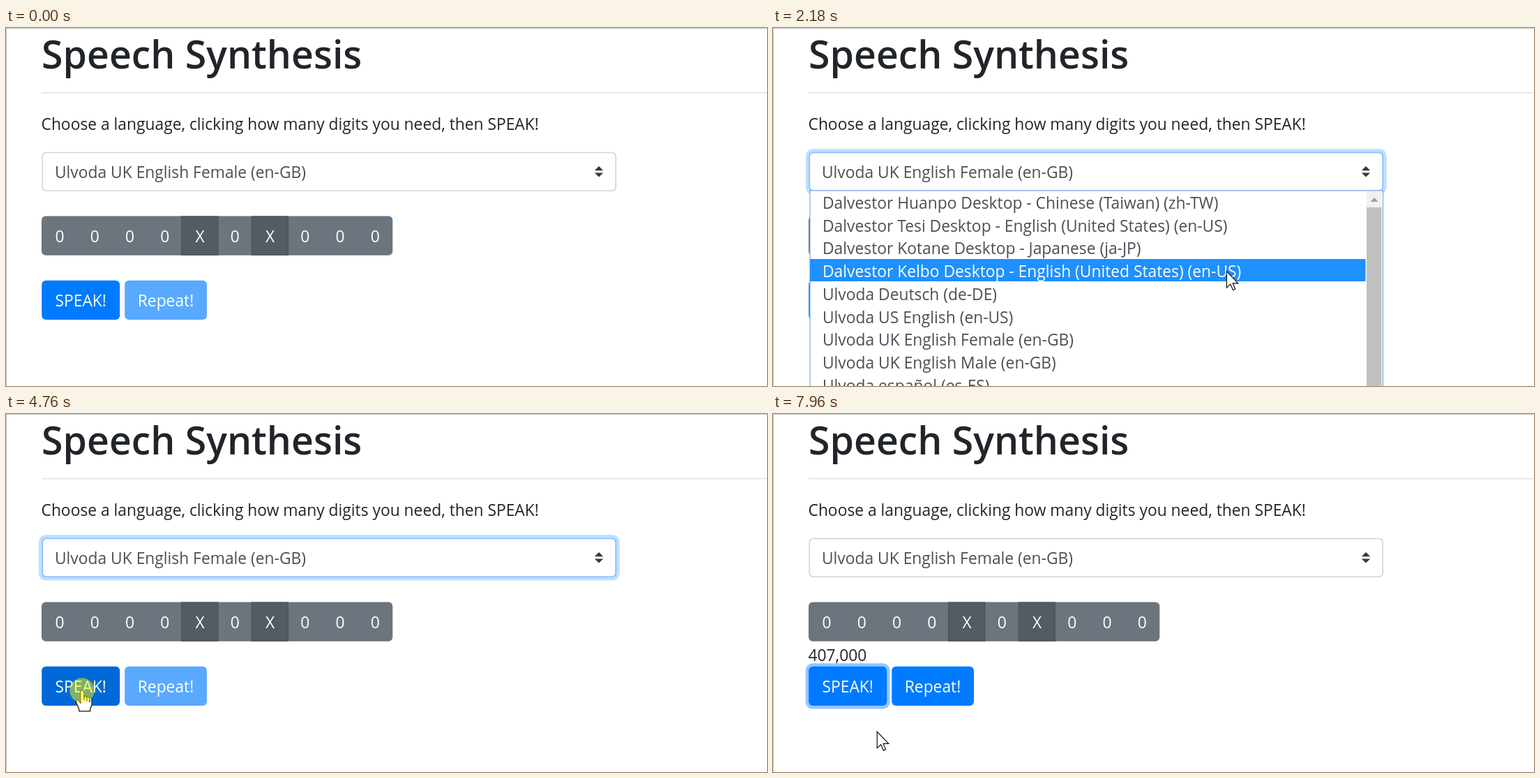
Recreate the animation shown at these times as an HTML page with a canvas. Size 1091x513 px, loop 8000 ms.

```html
<!DOCTYPE html>
<html lang="en">
<head>
<meta charset="utf-8">
<title>Speech Synthesis</title>
<style>
html, body { margin: 0; width: 100%; height: 100%; overflow: hidden; background: #fff; }
canvas { display: block; }
</style>
</head>
<body>
<canvas id="stage" width="1091" height="513"></canvas>
<script>
const ctx = document.getElementById('stage').getContext('2d');
const LOOP = 8000;
const FAMILY = '"Open Sans", "Noto Sans", sans-serif';
const BODY = `22.8px ${FAMILY}`;
const VOICE = 'Ulvoda UK English Female (en-GB)';
const OPTIONS = [
  'Dalvestor Huanpo Desktop - Chinese (Taiwan) (zh-TW)',
  'Dalvestor Tesi Desktop - English (United States) (en-US)',
  'Dalvestor Kotane Desktop - Japanese (ja-JP)',
  'Dalvestor Kelbo Desktop - English (United States) (en-US)',
  'Ulvoda Deutsch (de-DE)',
  'Ulvoda US English (en-US)',
  VOICE,
  'Ulvoda UK English Male (en-GB)',
  'Ulvoda español (es-ES)'
];
const ROW_TOP = 233, ROW_STEP = 32.7;
const TICK = 78; // pointer refresh interval

const smooth = k => k * k * (3 - 2 * k);
const easeOut = k => 1 - (1 - k) ** 2;

// Each move carries the pointer on from where the last one ended
const ENTRY = { x: 960, y: 498 };
const MOVES = [
  { from: 150, to: 870, x: 689, y: 189 },
  { from: 1710, to: 2490, x: 629, y: 435 },
  { from: 2560, to: 2790, x: 627, y: 444 },
  { from: 3190, to: 3970, x: 102, y: 423 },
  { from: 4040, to: 4440, x: 109, y: 396 },
  { from: 5300, to: 5700, x: 121, y: 435 },
  { from: 6020, to: 6320, x: 115, y: 388, ease: easeOut },
  { from: 7100, to: 7500, x: 136, y: 455 },
  { from: 7880, to: 7960, x: 149, y: 455 }
];

const OPEN = { from: 1180, to: 2960 };
const SPEAK = [{ from: 4760, to: 4905 }, { from: 6630, to: 6780 }];
const CLICKS = [{ from: 1000, to: 1180 }, { from: 2790, to: 2960 }, ...SPEAK];
const HOVERS = [{ from: 4040, to: 5460 }, { from: 6095, to: 7260 }];

const ARROW = new Path2D('M0 0V23.4L5.4 18.4 9 26.8 12.3 25.3 8.8 17.1H16.4Z');
const HAND = new Path2D('M-2.5 2a2.5 2.5 0 0 1 5 0V9c1-1.2 4-1 4.3 1 1-1.2 3.6-.8 3.9 1.2 1-.9 3-.2 3 1.8V20c0 3-2.4 4.5-2.4 7V29.5H-4.5V27.5C-4.5 25-8.5 19-9 15.5c-.2-2.5 2.4-3 3.8-1.2L-2.5 17.5Z');

const clamp = v => Math.max(0, Math.min(1, v));
const during = (span, t) => t >= span.from && t < span.to;
const ramp = (t, start) => clamp((t - start) / 150);
const fade = (spans, t) => spans.reduce((sum, s) => sum + ramp(t, s.from) - ramp(t, s.to), 0);
const lerp = (a, b, k) => a + (b - a) * k;
const mix = (a, b, k) => a.map((v, i) => lerp(v, b[i], k));
const rgb = c => `rgb(${c.map(Math.round).join()})`;

function pointerAt(t) {
  let { x, y } = ENTRY;
  for (const move of MOVES) {
    if (t < move.from) break;
    const span = move.to - move.from;
    const steps = Math.round(span / TICK);
    const step = Math.floor((t - move.from) / span * steps + 0.1);
    const k = (move.ease || smooth)(clamp(step / steps));
    x = lerp(x, move.x, k);
    y = lerp(y, move.y, k);
  }
  return { x, y };
}

function text(str, x, y, color, font = BODY, align = 'left') {
  ctx.font = font;
  ctx.textAlign = align;
  ctx.fillStyle = color;
  ctx.fillText(str, x, y);
}

function rect(x, y, w, h, color) {
  ctx.fillStyle = color;
  ctx.fillRect(x, y, w, h);
}

function rounded(x, y, w, h, r, color) {
  ctx.beginPath();
  ctx.roundRect(x, y, w, h, r);
  ctx.fillStyle = color;
  ctx.fill();
}

function triangle(x, y, half, height, color) {
  ctx.beginPath();
  ctx.moveTo(x, y);
  ctx.lineTo(x - half, y + height);
  ctx.lineTo(x + half, y + height);
  ctx.fillStyle = color;
  ctx.fill();
}

function drawPage() {
  rect(0, 0, 1091, 513, '#fff');
  rect(0, 0, 1091, 1, '#c4c4c4');
  rect(0, 0, 1, 513, '#c4c4c4');
  text('Speech Synthesis', 51, 58, '#212529', `600 55.4px ${FAMILY}`);
  rect(51, 92, 1040, 1.5, '#e3e3e3');
  text('Choose a language, clicking how many digits you need, then SPEAK!', 50.5, 146, '#212529');
}

function drawSelect(focus) {
  if (focus > 0) rounded(47, 173.2, 832.6, 65.4, 10, `rgba(0,123,255,${0.25 * focus})`);
  rounded(51.5, 177.7, 823.5, 56.3, 6, rgb(mix([206, 212, 218], [128, 189, 255], focus)));
  rounded(53.1, 179.3, 820.3, 53.1, 4.6, '#fff');
  text(VOICE, 70, 215, '#495057');
  triangle(850, 198, 6.2, 6.2, '#343a40');
  triangle(850, 213.6, 6.2, -6.2, '#343a40');
}

function drawDigits() {
  const pitch = 50.25;
  rounded(51, 269.5, 503.3, 56.3, 6, '#6c757d');
  [...'0000X0X000'].forEach((mark, i) => {
    const x = 77 + i * pitch;
    if (mark === 'X') {
      rect(x - 27, 269.5, 53.5, 56.3, '#4e555b');
      rect(x - 25.5, 271, 50.5, 53.3, '#545b62');
    }
    text(mark, x, 307, '#fff', BODY, 'center');
  });
}

function drawButtons(t) {
  const [first, second] = SPEAK;
  const spoken = t >= first.to;
  if (spoken) text(t < second.to ? '303,000' : '407,000', 50.5, 353.5, '#212529');
  const ring = ramp(t, first.from);
  if (ring > 0) rounded(46.7, 357.2, 121, 65.4, 10, `rgba(38,143,255,${0.5 * ring})`);
  const hover = mix([0, 123, 255], [0, 105, 217], fade(HOVERS, t));
  rounded(51.2, 361.7, 112, 56.3, 6, rgb(mix(hover, [0, 98, 204], fade(SPEAK, t))));
  text('SPEAK!', 107.2, 399, '#fff', BODY, 'center');
  rounded(170.2, 361.7, 117.8, 56.3, 6, spoken ? '#007bff' : '#59a9ff');
  text('Repeat!', 229, 399, '#fff', BODY, 'center');
}

function drawList(t, y) {
  const current = OPTIONS.indexOf(VOICE);
  const chosen = t < 2000 ? current : Math.floor((y - ROW_TOP) / ROW_STEP);
  rect(52.5, 232.5, 822.5, 290, '#6f9bd6');
  rect(53.5, 233.5, 820.5, 290, '#fff');
  OPTIONS.forEach((label, i) => {
    const top = Math.round(ROW_TOP + i * ROW_STEP);
    if (i === chosen) rect(53, top, 796.5, 32, '#1e90ff');
    text(label, 71, top + 26, i === chosen ? '#fff' : '#495057');
  });
  rect(851, 234, 22, 279, '#f1f1f1');
  rect(851, 257, 21.5, 256, '#c1c1c1');
  triangle(862, 243, 5.5, 6, '#a0a0a0');
}

function drawPointer(t, { x, y }) {
  const onButton = x > 51 && x < 163 && y > 361 && y < 418;
  const shape = onButton ? HAND : ARROW;
  ctx.save();
  ctx.translate(x + 0.3, y + 0.3);
  ctx.fillStyle = '#fff';
  ctx.fill(shape);
  ctx.lineWidth = 1.2;
  ctx.strokeStyle = '#111';
  ctx.stroke(shape);
  if (onButton) {
    ctx.beginPath();
    for (let i = 0; i < 3; i++) {
      ctx.moveTo(2.6 + i * 4, 9 + i * 1.5);
      ctx.lineTo(2.6 + i * 4, 14 + i * 1.5);
    }
    ctx.stroke();
  }
  ctx.restore();
  if (CLICKS.some(click => during(click, t))) {
    ctx.beginPath();
    ctx.arc(x, y, 17.7, 0, Math.PI * 2);
    ctx.fillStyle = 'rgba(255,250,0,.5)';
    ctx.fill();
  }
}

function draw(now) {
  const t = now % LOOP;
  const pointer = pointerAt(t);
  drawPage();
  drawSelect(ramp(t, 1030) - ramp(t, SPEAK[0].from + TICK));
  drawDigits();
  drawButtons(t);
  if (during(OPEN, t)) drawList(t, pointer.y);
  if (t >= MOVES[0].from) drawPointer(t, pointer);
}

const start = performance.now();
function tick() {
  draw(performance.now() - start);
  requestAnimationFrame(tick);
}
tick();
</script>
</body>
</html>
```
